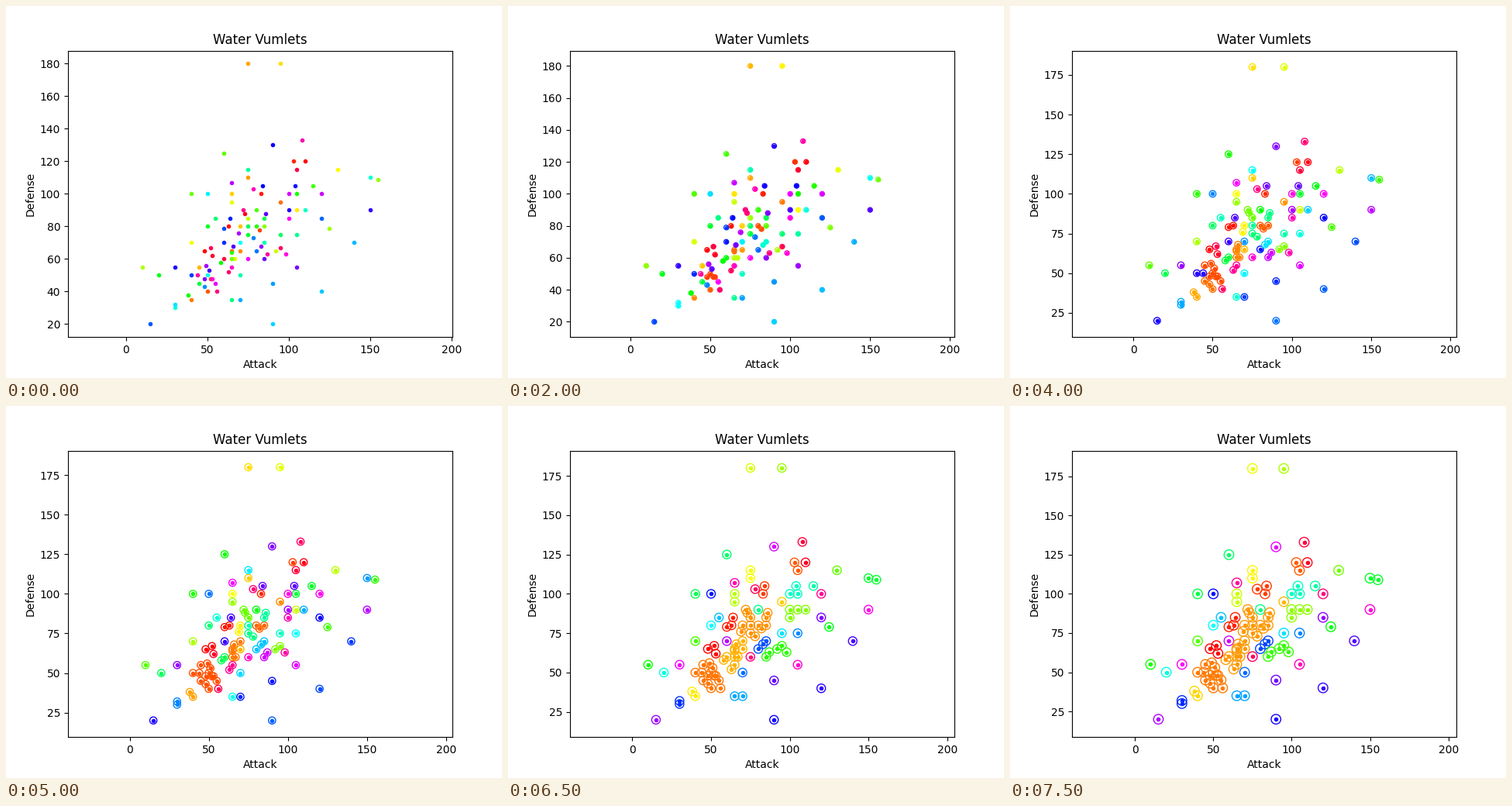
Recreate the animation shown at these times as a matplotlib script. Size 640x480 px, loop 8 s.

```python
from colorsys import hsv_to_rgb

import matplotlib.pyplot as plt
import numpy as np
from matplotlib.animation import FuncAnimation
from matplotlib.patches import Circle

STEPS = 16
INTERVAL = 500
REACH = 1.01  # circles reach slightly past the linking distance

attack = np.array([
    48, 63, 83, 103, 52, 82, 50, 65, 95, 40,
    70, 75, 75, 45, 70, 65, 95, 105, 130, 40,
    65, 67, 92, 75, 10, 125, 155, 85, 65, 40,
    60, 80, 115, 65, 80, 105, 38, 58, 20, 50,
    75, 45, 85, 75, 95, 55, 65, 105, 75, 70,
    85, 110, 150, 30, 50, 70, 50, 30, 90, 120,
    140, 70, 90, 48, 78, 80, 120, 15, 60, 40,
    60, 64, 104, 84, 90, 30, 100, 150, 51, 66,
    86, 85, 105, 48, 83, 49, 69, 65, 120, 100,
    55, 75, 100, 53, 98, 65, 78, 108, 44, 87,
    72, 56, 63, 95, 52, 105, 60, 53, 73, 110,
])
defense = np.array([
    65, 80, 100, 120, 48, 78, 40, 65, 95, 35,
    65, 110, 180, 55, 80, 100, 180, 90, 115, 70,
    95, 60, 65, 85, 55, 79, 109, 80, 60, 100,
    125, 90, 105, 64, 80, 100, 38, 58, 50, 80,
    75, 45, 85, 80, 75, 85, 35, 75, 115, 50,
    70, 90, 110, 30, 50, 70, 100, 32, 20, 40,
    70, 35, 45, 43, 73, 65, 85, 20, 79, 50,
    70, 85, 105, 105, 130, 55, 90, 90, 53, 68,
    88, 60, 55, 48, 68, 56, 76, 107, 100, 100,
    45, 60, 85, 48, 63, 55, 103, 133, 50, 63,
    90, 40, 52, 67, 67, 115, 60, 62, 88, 120,
])


def link_steps(x, y, count):
    """Single-linkage clustering: (distance, labels) at each distance that merges."""
    sq = (x[:, None] - x) ** 2 + (y[:, None] - y) ** 2
    labels = np.arange(len(x))
    steps = [(0.0, labels)]
    for d2 in np.unique(sq)[1:]:
        merged = labels.copy()
        for i, j in np.argwhere(sq == d2):
            low, high = sorted((merged[i], merged[j]))
            merged[merged == high] = low
        if (merged != labels).any():
            labels = merged
            steps.append((np.sqrt(d2), labels))
        if len(steps) == count:
            break
    return steps


def cluster_colors(labels):
    rank = np.unique(labels, return_inverse=True)[1]
    return [hsv_to_rgb(h, 1, 1) for h in rank / (rank.max() + 1)]


steps = link_steps(attack, defense, STEPS)

fig, ax = plt.subplots(figsize=(6.4, 4.8), dpi=100)
ax.set_title("Water Vumlets")
ax.set_xlabel("Attack")
ax.set_ylabel("Defense")

rings, dots = [], []
for x, y in zip(attack, defense):
    rings.append(ax.add_patch(Circle((x, y), 0, fill=False)))
    dots += ax.plot(x, y, ".")

mid_x = (attack.min() + attack.max()) / 2
mid_y = (defense.min() + defense.max()) / 2
half_y = (defense.max() - defense.min()) / 2
box = ax.get_position()
ratio = box.width * 6.4 / (box.height * 4.8)


def draw(k):
    dist, labels = steps[k]
    radius = REACH * dist / 2
    for ring, dot, color in zip(rings, dots, cluster_colors(labels)):
        ring.set_radius(radius)
        ring.set_edgecolor(color)
        dot.set_color(color)
    # equal scale on both axes, with a 5% margin around the circles
    h = 1.1 * (half_y + radius)
    ax.set_xlim(mid_x - h * ratio, mid_x + h * ratio)
    ax.set_ylim(mid_y - h, mid_y + h)
    return rings + dots


anim = FuncAnimation(fig, draw, frames=STEPS, interval=INTERVAL,
                     repeat=True, repeat_delay=0)
plt.show()
```
